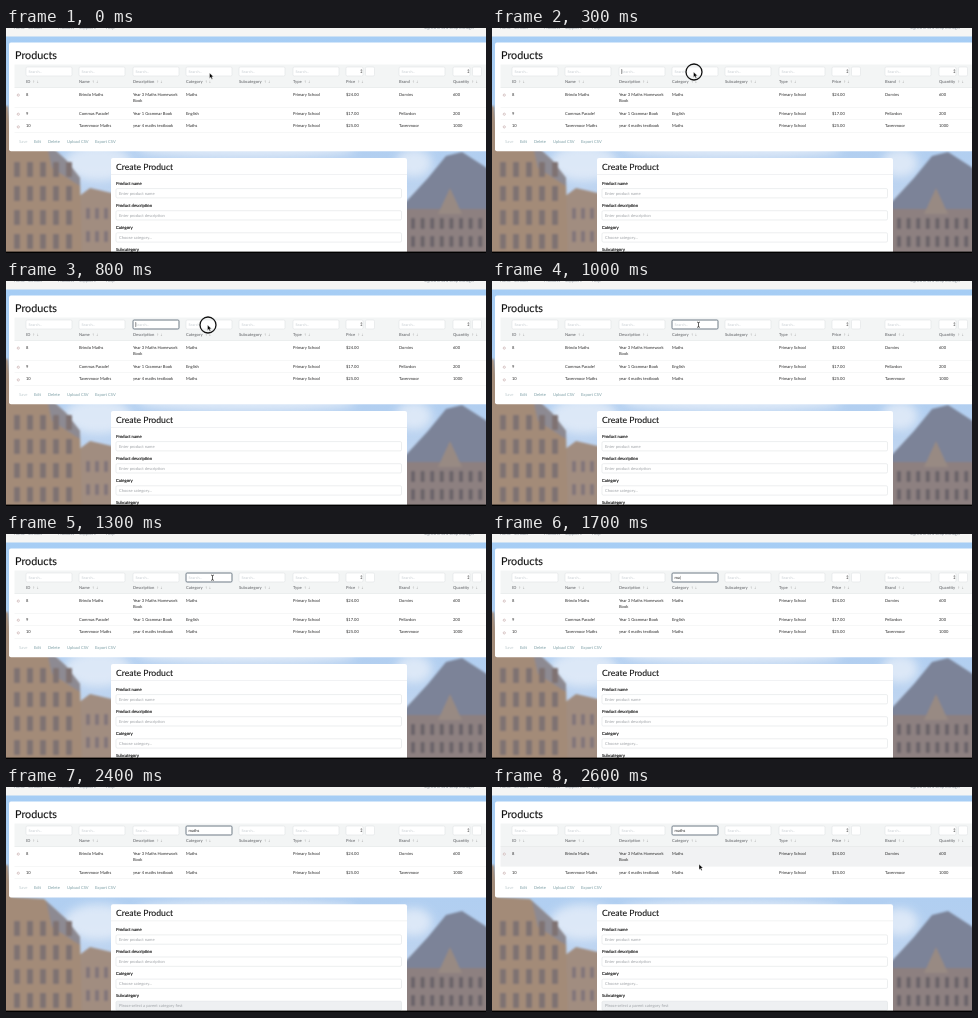
An HTML page that plays this animation: 480 px wide and 225 px high, repeating every 2.7 s.

```html
<!DOCTYPE html>
<html lang="en">
<head>
<meta charset="utf-8">
<title>Product table filter</title>
<style>
  html, body { margin: 0; height: 100%; overflow: hidden; background: #b4d0f0; }
  svg { display: block; width: 100vw; height: 100vh; }
  text { font: 4.1px Lato, sans-serif; fill: #2a2a2a; text-rendering: geometricPrecision; white-space: pre; }
  .title { fill: #111; stroke: #111; stroke-width: .12; }
  .head { font-weight: 700; fill: #7d7f82; }
  .sort { font: 3.4px "DejaVu Sans", sans-serif; fill: #aaa; }
  .spin { font: 5px "DejaVu Sans", sans-serif; fill: #666; }
  .hint { fill: #a0a4a8; }
  .faint { fill: #c6ccd1; font-size: 3.7px; }
  .link { fill: #7d9fa6; }
  .off { fill: #c3cfd2; }
  .nav { fill: #8a929a; }
  .box { fill: #fff; stroke: #dfe2e5; stroke-width: .6; }
  .ring { fill: none; stroke: #727b85; stroke-width: .8; }
  .glow { fill: none; stroke: #ccd4dc; stroke-width: 1.8; opacity: .5; }
</style>
</head>
<body>
<svg id="stage" viewBox="0 0 480 225" preserveAspectRatio="none"></svg>
<script>
const stage = document.getElementById('stage');
const $ = id => document.getElementById(id);

const rect = (x, y, w, h, fill, r = 0) =>
  `<rect x="${x}" y="${y}" width="${w}" height="${h}" rx="${r}" fill="${fill}"/>`;
const text = (x, y, content, cls = '', size = '') =>
  `<text x="${x}" y="${y}" class="${cls}"${size && ` style="font-size:${size}px"`}>${content}</text>`;
const box = (x, y, w, h) => `<rect class="box" x="${x}" y="${y}" width="${w}" height="${h}" rx="1.3"/>`;
const poly = (points, fill) => `<polygon points="${points}" fill="${fill}"/>`;
const cloud = (x, y, rx, ry) => `<ellipse cx="${x}" cy="${y}" rx="${rx}" ry="${ry}" fill="#eef3fa" opacity=".7" filter="url(#haze)"/>`;
const group = (id, content) => `<g id="${id}">${content}</g>`;

function windows(x0, y0, cols, rows, dx, dy, w, h, fill) {
  let out = '';
  for (let r = 0; r < rows; r++)
    for (let c = 0; c < cols; c++)
      out += rect(x0 + c * dx, y0 + r * dy, w, h, fill, 1);
  return out;
}

function scenery() {
  return rect(0, 0, 480, 225, 'url(#sky)') +
    cloud(92, 135, 34, 18) + cloud(240, 122, 110, 9) + cloud(408, 135, 18, 14) +
    `<g filter="url(#soft)">` +
    // left wing with its lower annexe
    poly('68,172 84,160 110,166 110,228 68,228', '#a18d80') +
    poly('-4,78 2,78 6,110 38,112 60,132 74,150 76,228 -4,228', '#a38b78') +
    poly('40,114 60,132 74,150 74,158 46,140', '#8d8a92') +
    windows(8, 134, 5, 4, 13, 24, 6, 15, '#7f7272') +
    windows(80, 180, 3, 2, 9, 23, 4, 11, '#82767a') +
    // right wing under a steep slate roof
    poly('398,176 422,150 440,128 456,124 484,142 484,190 398,190', '#7b8398') +
    rect(398, 181, 86, 48, '#8d8080') +
    poly('432,186 444,160 456,186', '#988a83') +
    windows(405, 190, 8, 2, 9.6, 18, 4, 11, '#6a6369') +
    '</g>';
}

const columns = [[20, 'ID'], [73, 'Name'], [127, 'Description'], [180, 'Category'], [233, 'Subcategory'],
                 [287, 'Type'], [340, 'Price'], [393, 'Brand'], [447, 'Quantity']];

function tableHead() {
  return rect(8.5, 36.5, 472, 23, '#f3f5f5') + rect(8.5, 59, 472, .6, '#e3e6e7') +
    columns.map(([x, label]) => {
      const numeric = label === 'Price' || label === 'Quantity';
      const field = numeric
        ? box(x, 39, 17, 9) + box(x + 19.5, 39, 9, 9) + text(x + 13.2, 45.3, '↕', 'spin')
        : box(x, 39, 46, 9) + group('hint' + label, text(x + 2.6, 45, 'Search...', 'faint'));
      return field + `<text x="${x}" y="55.2" class="head">${label}<tspan class="sort" dx="2">↑ ↓</tspan></text>`;
    }).join('');
}

function row(id, y, bottom, cells, extra = '') {
  return group(id,
    `<circle cx="12.3" cy="${y - .5}" r="1.1" fill="#fff" stroke="#c0a3a3" stroke-width=".6"/>` +
    cells.map((cell, i) => text(columns[i][0], y, cell)).join('') + extra +
    rect(8.5, bottom, 472, .5, '#eceeef'));
}

function focusRing(id, x) {
  const shape = cls => `<rect class="${cls}" x="${x}" y="39" width="46" height="9" rx="1.3"/>`;
  return group(id, shape('glow') + shape('ring'));
}

function formField(y, label, hint, fill = '#fff') {
  return text(110, y, label, 'title', 4.2) +
    box(110, y + 4, 285.5, 9.3).replace('/>', ` style="fill:${fill}"/>`) +
    text(113, y + 10.1, hint, 'hint');
}

stage.innerHTML = `
  <defs>
    <linearGradient id="sky" x2="0" y2="1"><stop stop-color="#a5cdf5"/><stop offset=".6" stop-color="#b3cff0"/><stop offset="1" stop-color="#d3def0"/></linearGradient>
    <filter id="haze" x="-50%" y="-50%" width="200%" height="200%"><feGaussianBlur stdDeviation="5"/></filter>
    <filter id="soft"><feGaussianBlur stdDeviation="1.1"/></filter>
  </defs>` +
  scenery() +
  rect(0, 0, 480, 8.5, '#f5f5f4') +
  [[8, 'Home'], [22, 'Schools'], [52, 'Products'], [73, 'Suppliers'], [100, 'Help'], [418, 'Signed in as a shop manager']]
    .map(([x, label]) => text(x, .8, label, 'nav')).join('') +
  `<rect id="panel" x="3" y="14.5" width="480" rx="2" fill="#fff"/>` +
  text(9, 30.7, 'Products', 'title', 10.8) +
  group('hover', rect(8.5, 59.5, 472, 19.5, '#f1f2f3')) +
  tableHead() +
  row('first', 67.6, 79, ['8', 'Brindo Maths', 'Year 3 Maths Homework', 'Maths', '', 'Primary School', '$24.00', 'Dorvins', '600'],
    text(127, 73.6, 'Book')) +
  row('second', 86.7, 91.5, ['9', 'Commas Parade!', 'Year 1 Grammar Book', 'English', '', 'Primary School', '$17.00', 'Pellardon', '200']) +
  row('third', 99.4, 104, ['10', 'Tavenmoor Maths', 'year 4 maths textbook', 'Maths', '', 'Primary School', '$25.00', 'Tavenmoor', '1000']) +
  group('links', text(13, 114.7, 'Save', 'off') +
    [[28, 'Edit'], [42, 'Delete'], [61, 'Upload CSV'], [89, 'Export CSV']].map(([x, label]) => text(x, 114.7, label, 'link')).join('')) +
  group('form', rect(105, 130, 296, 130, '#fff', 2) + rect(105, 146.3, 296, .6, '#e8eaec') +
    text(110, 141.6, 'Create Product', 'title', 8.65) +
    formField(156.6, 'Product name', 'Enter product name') +
    formField(178.7, 'Product description', 'Enter product description') +
    formField(200.8, 'Category', 'Choose category...') +
    formField(222.9, 'Subcategory', 'Please select a parent category first', '#eef0f2')) +
  focusRing('ringDescription', 127) + focusRing('ringCategory', 180) +
  rect(129.6, 41, .5, 5, '#333').replace('<rect', '<rect id="caret"') +
  '<text id="typed" x="182.4" y="45.2"></text>' +
  '<circle id="click" cx="202" cy="44" r="8" fill="none" stroke="#111" stroke-width="1.3"/>' +
  '<path id="arrow" d="M0 0V5.4L1.3 4.2 2.2 6.3 3.2 5.9 2.3 3.8H4Z" fill="#000" stroke="#fff" stroke-width=".4"/>' +
  '<path id="beam" d="M205 41.2h1l.5.4.5-.4h1M206.5 41.4v4.6M205 46.2h1l.5-.4.5.4h1" fill="none" stroke="#222" stroke-width=".7"/>' +
  rect(0, 223.6, 480, 2, '#000');

const show = (id, on) => $(id).setAttribute('opacity', Number(on));
const move = (id, x, y) => $(id).setAttribute('transform', `translate(${x} ${y})`);
const clamp = v => Math.min(1, Math.max(0, v));

const keyTicks = [15, 16, 18, 19, 21];

function draw(tick) {
  const filtered = tick >= 24;
  const typed = 'maths'.slice(0, keyTicks.filter(k => tick >= k).length);

  show('ringDescription', tick < 9 ? clamp((tick - 3) / 2) : clamp((10 - tick) / 2));
  show('ringCategory', clamp((tick - 8) / 2));
  show('caret', tick >= 3 && tick < 9);
  show('click', tick >= 2 && tick < 9);
  show('hintCategory', !typed);
  $('typed').textContent = typed && !filtered ? typed + '|' : typed;

  show('arrow', tick < 10 || tick >= 25);
  show('beam', tick >= 10 && tick < 14);
  const approach = clamp(tick / 3);
  if (tick < 25) move('arrow', 203.5 - 2 * approach, 45 - approach);
  else move('arrow', 207, tick === 25 ? 66 : 77.3);

  show('hover', tick >= 25);
  show('second', !filtered);
  move('third', 0, filtered ? -12.7 : 0);
  move('links', 0, filtered ? -12.7 : 0);
  move('form', 0, filtered ? -12.7 : 0);
  $('panel').setAttribute('height', filtered ? 96 : 108.7);
}

function frame() {
  draw(Math.floor(performance.now() % 2700 / 100));
  requestAnimationFrame(frame);
}
frame();
</script>
</body>
</html>
```
